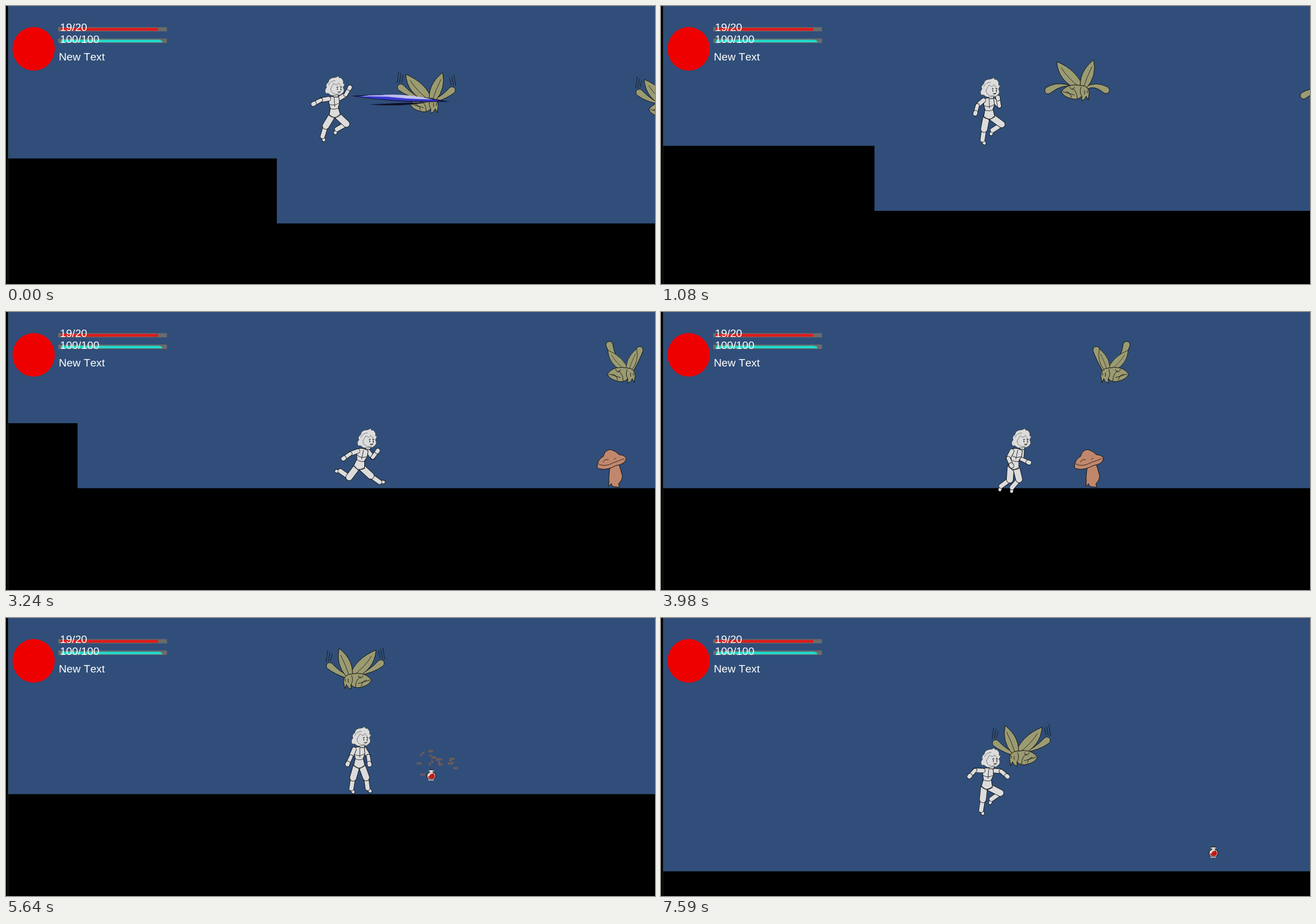
These frames come from a looping animation (1143x490 px, 8000 ms). An HTML page:

```html
<!DOCTYPE html>
<html lang="en">
<head>
<meta charset="utf-8">
<title>Platformer</title>
<style>
html, body { margin: 0; width: 100%; height: 100%; overflow: hidden; background: #000; }
svg { display: block; width: 1143px; height: 490px; }
text { font: 19.2px "Liberation Sans", Arial, sans-serif; font-kerning: none; fill: #fff; }
</style>
</head>
<body>
<svg viewBox="0 0 1143 490">
  <rect x="3" width="1140" height="490" fill="#304e79"/>
  <g id="world" stroke-linejoin="round" stroke-linecap="round"></g>
  <rect width="3" height="490"/>
  <rect x="3" width="1" height="490" fill="#242424"/>
  <ellipse cx="48.7" cy="75.5" rx="37.2" ry="38.5" fill="#ee0000"/>
  <rect x="92" y="37.3" width="191.5" height="7.4" fill="#6b6b6b"/>
  <rect x="96" y="38.6" width="172" height="5" fill="#dc1c1c"/>
  <rect x="92" y="57.4" width="191.5" height="7.8" fill="#6b6b6b"/>
  <path d="M97 59.5H270L275 61.5V64H97z" fill="#1fdccb"/>
  <text x="95" y="44.3">19/20</text>
  <text x="95" y="65.3">100/100</text>
  <text x="93" y="96.4">New Text</text>
</svg>
<script>
const LOOP = 8000;
const world = document.getElementById("world");

// The picture is held between steps: first, last, count
const steps = [0];
for (const [a, b, n] of [
  [60, 780, 10], [870, 1080, 4], [1310, 1690, 2], [1910, 2170, 4], [2260, 2320, 2],
  [2550, 2870, 5], [3170, 3240, 2], [3540, 3980, 6], [4210, 4510, 5],
  [4680, 5310, 9], [5500, 6250, 11], [6330, 7120, 11], [7270, 7590, 5]
]) for (let i = 0; i < n; i++) steps.push(Math.floor((a + (b - a) * i / (n - 1)) / 10) * 10);

// Straight motion between [time, value] keys
const track = (...k) => t => {
  let i = 1;
  while (i < k.length - 1 && t > k[i][0]) i++;
  const [a, x] = k[i - 1], [b, y] = k[i];
  return x + (y - x) * Math.min(1, Math.max(0, (t - a) / (b - a)));
};
const edgeX = track([0, 477], [1080, 376], [2170, 346], [3240, 126], [3980, -205], [5900, -228], [6560, -82], [7120, -8], [7590, 0]);
const heroX = track([0, 575], [1080, 577], [2170, 607], [3240, 628], [5600, 624], [6560, 523], [7120, 525], [7590, 575]);
const patrol = track([0, 688], [1080, 812], [3240, 966], [3740, 1020], [7590, 630]);
const shroomX = track([3240, 940], [4680, 975]);

// Jumps are parabolas; the camera repeats them a little later
const jumps = [[-275, 748, 145], [794, 1305, 150], [6808, 988, 145]];
const DELAY = 165, GROUND = 310.5;
function lift(t) {
  for (const [start, time, high] of jumps) {
    const u = (t - start) / time;
    if (u > 0 && u < 1) return 4 * high * u * (1 - u);
  }
  return 0;
}
const floorY = t => GROUND + lift(t - DELAY);
const strikes = [[-100, 200], [1600, 1900], [5220, 5500]];
const within = (t, list) => list.some(([a, b]) => t >= a && t < b);

const INK = "#111", SKIN = "#dcdcdc", MOTH = "#9b9b72", SHROOM = "#c0876d";
const path = (d, fill, line = 1, col = INK) =>
  `<path d="${d}" fill="${fill}" stroke="${col}" stroke-width="${line}"/>`;
const group = (x, y, flip, body, turn = 0) =>
  `<g transform="translate(${x.toFixed(1)} ${y.toFixed(1)}) rotate(${turn}) scale(${flip} 1)">${body}</g>`;

// Angles in degrees from straight down, forward is positive
const reach = ([x, y], angle, len) => {
  const a = angle * Math.PI / 180;
  return [x + Math.sin(a) * len, y + Math.cos(a) * len];
};

// hip: place above the feet; limbs: upper and lower angle, back one first
const poses = {
  stand: { hip: [-2, -51], lean: 0, arms: [-23, -25, 30, 8], legs: [-16, -9, 20, 8] },
  strike: { hip: [4, -57], lean: -4, arms: [-80, -62, 120, 150], legs: [-31, -17, 47, -60] },
  rise: { hip: [1, -64], lean: -2, arms: [-50, -15, 45, -170], legs: [-11, -8, 54, -57] },
  fall: { hip: [-1, -54], lean: 4, arms: [-92, -42, 85, 50], legs: [-6, -9, 63, -55] },
  land: { hip: [-5, -34], lean: 10, arms: [-92, -57, 80, 60], legs: [-55, 15, 70, -25] }
};

function running(t) {
  const p = Math.PI * 2 * (t - 3240) / 415;
  const arms = [], legs = [];
  for (const side of [-1, 1]) {
    const s = side * Math.cos(p), c = side * -Math.sin(p);
    arms.push(-16 + 54 * s, 44 + 99 * s);
    legs.push(5 + 42 * s, -35 + 90 * s - 25 * Math.max(0, c));
  }
  return { hip: [-6, -38], lean: 13, arms, legs };
}

function pose(t) {
  if (within(t, strikes)) return poses.strike;
  if (lift(t) > 0) return lift(t + 10) > lift(t) ? poses.rise : poses.fall;
  if (jumps.some(([a, d]) => t >= a + d && t < a + d + 200)) return poses.land;
  return Math.abs(edgeX(t + 40) - edgeX(t - 40)) > 8 ? running(t) : poses.stand;
}

function bone(a, b, w) {
  const d = `M${a.map(v => v.toFixed(1))}L${b.map(v => v.toFixed(1))}`;
  return path(d, "none", w + 1.7) + path(d, "none", w, SKIN);
}
function arm(from, upper, lower) {
  const e = reach(from, upper, 14), h = reach(e, lower, 13);
  return bone(from, e, 7) + bone(e, h, 6) + bone(h, reach(h, lower, 2), 7);
}
function leg(from, upper, lower) {
  const k = reach(from, upper, 21), a = reach(k, lower, 19);
  return bone(a, reach(a, lower + 35, 7), 5) + bone(k, a, 7.5) + bone(from, k, 11);
}

const torso =
  path("M-8-31Q0-34 9-31L10-20L7-12L10 1Q0 9-10 1L-7-12L-9-21z", SKIN) +
  path("M-8-19Q0-14 9-20M-7-11Q0-8 7-11M1-30V-14M-9 0L0 7L9 0", "none", .8);
const head =
  path("M-4 8L-3 17H5L6 8z", SKIN) +
  path("M-9 13Q-12 9-16 11Q-20 5-15 0Q-18-5-12-9Q-11-16-4-17Q1-17 6-20L7-17L10-17Q16-12 14-7L17-6L14 0Q18 7 12 11Q9 15 4 13Q-4 16-9 13z", SKIN, .7, "#333") +
  path("M-8 2A9 9 0 0 0 11 3M-8 2L-3-7L3-4L6-8L12 0M-12-4Q-8-12 0-12", "none", .7, "#555") +
  path("M3 0L5-1M9-1L11 0M4 2V4M10 2V4M5 8H9", "none", 1.2);

function hero({ hip: [x, y], lean, arms, legs }) {
  const [cx, cy] = reach([x, y], 180 - lean, 28);
  return arm([cx + 9, cy], arms[2], arms[3]) +
    leg([x - 5, y + 2], legs[0], legs[1]) + leg([x + 5, y + 2], legs[2], legs[3]) +
    group(x, y, 1, torso, lean) + arm([cx - 9, cy], arms[0], arms[1]) +
    group(cx + 4 + lean / 3, cy - 20, 1, head);
}

// A thin lens from one point to another
const blade = (x, y, x2, y2, up, down, col) =>
  path(`M${x} ${y}Q${(x + x2) / 2} ${y - up} ${x2} ${y2}Q${(x + x2) / 2} ${y + down} ${x} ${y}z`, col, 0);
const slash =
  blade(64, -75, 170, -79, 3, 5, "#10102a") + blade(32, -90, 206, -80, 7, 14, "#14143a") +
  blade(44, -89, 190, -81, 9, 10, "#3838cf") + blade(80, -91, 176, -84, 4, 7, "#c4c4ea") +
  blade(48, -89, 130, -86, 6, -1, "#b4b4ec");

// One cycle of four wing beats: falling, low, rising, high
const beat = t => Math.floor((t / 254 + .165) * 4) % 4;

function wing(side, state) {
  const s = Math.sin(state * Math.PI / 2), c = Math.cos(state * Math.PI / 2);
  const size = side < 0 ? 1 : .82, a = 118 - 31 * s, root = [side < 0 ? -7 : 8, -4];
  const bend = reach([0, 0], side * (a + 8 - 18 * c + 20 * s), 35 * size);
  const tip = reach([0, 0], side * a, 58 * size);
  const l = Math.hypot(tip[0] - bend[0], tip[1] - bend[1]);
  const u = (tip[0] - bend[0]) / l, v = (tip[1] - bend[1]) / l;
  const at = (q, along, off) => [q[0] + u * along - v * off, q[1] + v * along + u * off].map(n => n.toFixed(1));
  const dir = c || -s;
  let trail = "";
  if (state !== 1) for (let i = 0; i < 3; i++)
    trail += `M${tip[0] + side * (5 - 4 * i)} ${tip[1] - dir * (6 + i)}l${-3 * side} ${-dir * (20 - 4 * i)}`;
  return path(trail, "none", .8) +
    path(`M${root}Q${at(bend, 0, -4)} ${at(tip, -3, -6)}C${at(tip, 6, -6)} ${at(tip, 6, 6)} ${at(tip, -3, 6)}Q${at(bend, 0, 4)} ${root[0] + 4} ${root[1] + 4}z`, MOTH);
}

const petals =
  path("M-3 1Q-39-15-41-49Q-5-34 6-3z", MOTH) + path("M1 1Q-4-30 24-52Q30-24 12-3z", MOTH) +
  path("M0-3Q-22-20-33-38M6-3Q12-22 21-40", "none", .8);
const body =
  path("M-33 4Q-25-8-8-8L8-6Q17-1 16 8L14 19L11 12L8 17L3 20L3 12Q-4 20-16 16Q-29 13-33 4z", MOTH) +
  path("M-24 4Q-17 5-15 14M-14-2Q-5 3-5 16M-18-4a4 4 0 1 0 8 0M2-4Q-2 4 3 12M8 2V8M13 2V6M-30 4L-10 10", "none", .9);
const moth = state => wing(-1, state) + wing(1, state) +
  `<g transform="scale(${state === 3 ? .78 : 1})">${petals}</g>` + body;

const stems = [
  "M-2-39Q-5-20-4-12L-5-3L0-8L2-3L11-2L14-1L13-8Q21-16 19-24Q16-34 14-41z",
  "M1-39Q2-28-4-20Q-7-8 2-5L7-1L10-6Q18-9 20-17Q17-30 14-41z"
];
const cap =
  path("M-25-38Q-24-51-14-56Q-11-68-1-68Q7-66 14-59Q26-58 26-51Q23-42 9-40Q-8-31-20-34Q-25-35-25-38z", SHROOM) +
  path("M-23-43Q-12-36 4-45Q16-49 23-52M-14-46Q-12-52-5-50M5-51L8-53", "none", .8);
const shroom = t => path(stems[Math.floor(t / 160) % 2], SHROOM) + cap;

const potion =
  path("M-3-9H3V-5L7-2L8 3L5 8L-5 8L-8 3L-7-2L-3-5z", "#d5cdc3", 1.4, "#2a2525") +
  path("M-1-1L4-3L6 1V4L3 7H-3L-6 3z", "#bd1c1c", 0) +
  path("M-4-7H4M-4 0V2", "none", 1.6, "#f3eee6") + path("M-5 9H4", "none", 1.5, "#ddd");

// Small clusters of square bits flying apart and thinning out
function burst(x, y, u, col) {
  let seed = 7, out = "";
  const rnd = () => (seed = seed * 16807 % 2147483647) / 2147483647;
  for (let i = 0; i < 14; i++) {
    const a = rnd() * Math.PI * 2, r = (30 + 65 * rnd()) * Math.sqrt(u);
    for (let j = 0; j < 2; j++) {
      const bx = x + Math.cos(a) * r + 4 * j, by = y + Math.sin(a) * r * .8 + 4 * Math.round(rnd());
      if (i > 10 * u - 4) out += `<rect x="${bx.toFixed(1)}" y="${by.toFixed(1)}" width="4" height="4" fill="${col}"/>`;
    }
  }
  return out;
}

function draw(t) {
  const edge = edgeX(t), floor = floorY(t), state = beat(t);
  const x = heroX(t), y = floor - lift(t);
  let out = `<path d="M0 ${floor - 114.5}H${Math.max(0, edge)}V${floor}H1143V490H0z"/>`;

  if (t < 1900) out += group(edge + 268 + t * .087, floor - 214, 1, moth(state));
  out += group(edge + patrol(t), floor - 205, t < 3740 ? 1 : -1, moth(state));
  out += t < 5500 ? group(edge + shroomX(t), floor, 1, shroom(t)) : group(edge + 973, floor - 34, 1, potion);

  out += group(x, y, t >= 5900 && t < 7200 ? -1 : 1, hero(pose(t)) + (within(t, strikes) ? slash : ""));

  if (t >= 1900 && t < 2550) out += burst(edge + 374, floor - 245, (t - 1700) / 600, "#5b5959");
  if (t >= 5500 && t < 6200) out += burst(edge + 973, floor - 48, (t - 5400) / 900, "#6a5a5a");
  world.innerHTML = out;
}

let shown = -1;
const began = performance.now();
function tick(now) {
  const t = Math.max(0, now - began) % LOOP;
  let held = 0;
  for (const s of steps) if (s <= t) held = s;
  if (held !== shown) draw(shown = held);
  requestAnimationFrame(tick);
}
draw(shown = 0);
requestAnimationFrame(tick);
</script>
</body>
</html>
```
